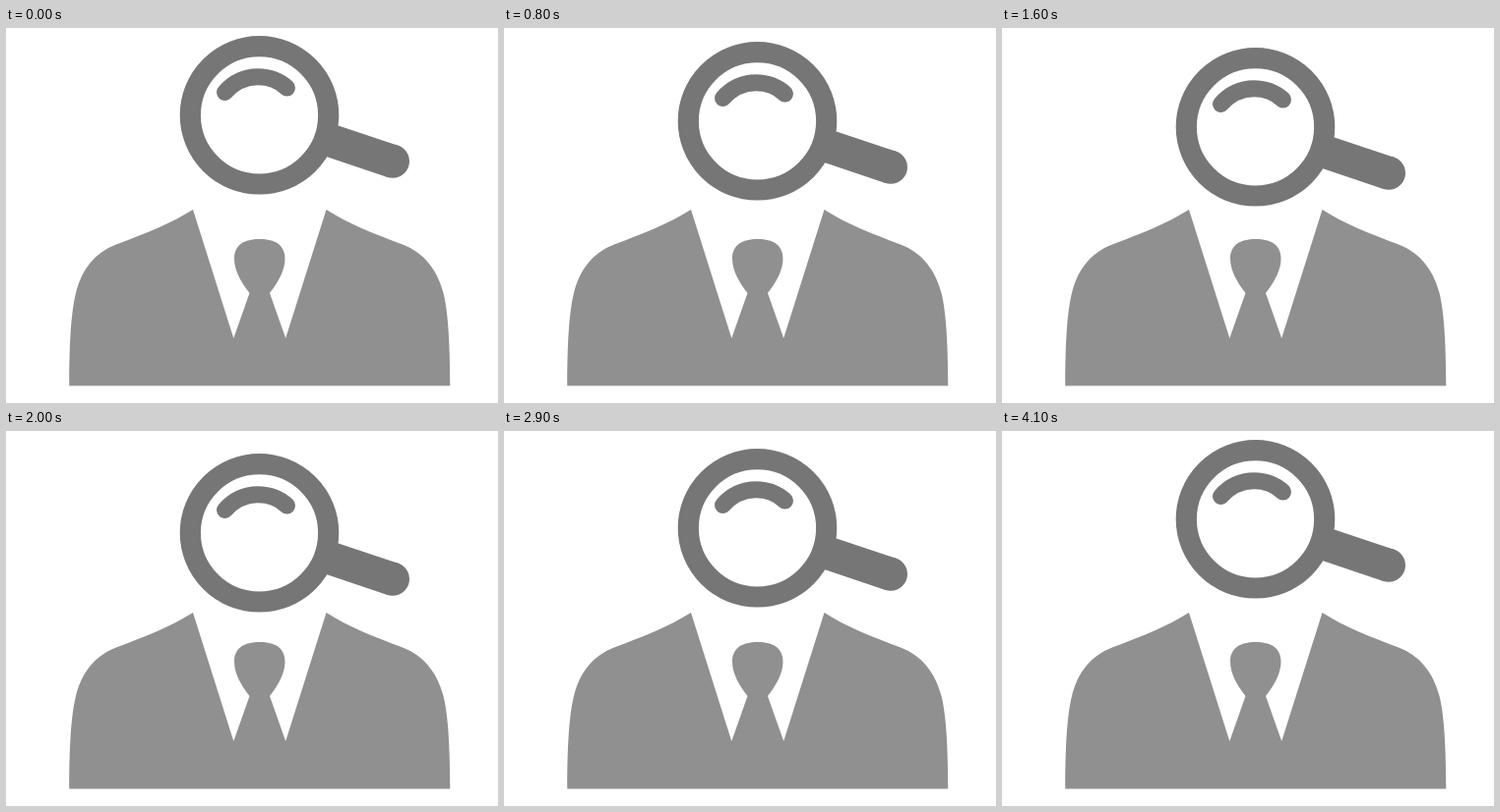
These frames come from a looping animation (500 by 382 pixels, 4200 ms). An HTML page:

```html
<!DOCTYPE html>
<html lang="en">
<head>
<meta charset="utf-8">
<title>Person search</title>
<style>
  html, body { margin: 0; width: 100%; height: 100%; overflow: hidden; background: #fff; }
  svg { display: block; width: 100%; height: 100%; }
  .suit { fill: #909090; }
  #lens { fill: none; stroke: #767676; }
</style>
</head>
<body>
<svg viewBox="0 0 500 382">
  <path class="suit" d="M64.3 364.5 C64.3 325 66 289 71 270 C77 246 90 229 112 220.5 C141 209.5 168 199 190 185
    L231.3 316 L247.5 270 C238 258 232 246 232 235 C232 221 242 215 257.8 215
    C273.5 215 283.5 221 283.5 235 C283.5 246 277.5 258 268 270
    L284.2 316 L325.5 185 C347 199 374 209.5 403 220.5 C425 229 438 246 444.5 270 C449.5 289 451.3 325 451.3 364.5 Z"/>
  <g id="lens">
    <circle cx="257.5" cy="88.8" r="70.2" stroke-width="21.2"/>
    <path d="M222.5 65.5 Q236 50 256 49.8 Q274 50 285.5 61" stroke-width="17" stroke-linecap="round"/>
    <path d="M325 113 L393 135.8" stroke-width="34"/>
    <circle cx="393" cy="135.8" r="8.5" stroke-width="17"/>
  </g>
</svg>
<script>
  const STEPS = 42, STEP_MS = 100, RISE = 0.75;

  // The lens sinks and climbs at a constant rate, snapped to whole pixels.
  const keyframes = Array.from({ length: STEPS + 1 }, (_, i) => ({
    offset: i / STEPS,
    easing: 'steps(1, end)',
    transform: `translateY(${Math.round(RISE * Math.min(i, STEPS - i))}px)`
  }));

  document.getElementById('lens').animate(keyframes, {
    duration: STEPS * STEP_MS,
    iterations: Infinity
  });
</script>
</body>
</html>
```
